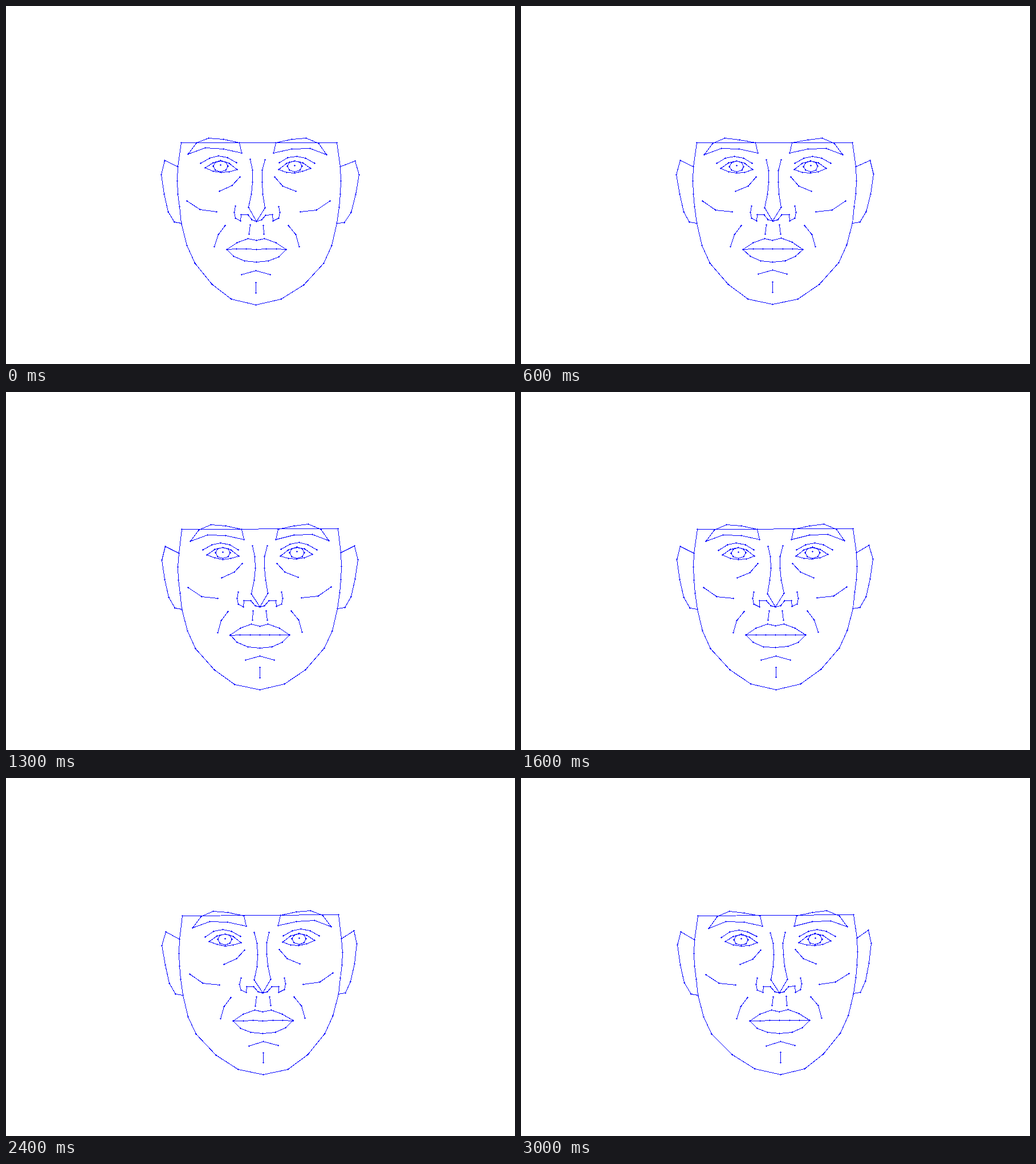
Write an HTML page that moves like this. It is 893 by 627 pixels and loops after 3.1 s.

```html
<!DOCTYPE html>
<html lang="en">
<head>
<meta charset="utf-8">
<title>Turning face</title>
<style>
  html, body { margin: 0; width: 100%; height: 100%; overflow: hidden; background: #fff; }
  svg { display: block; width: 893px; height: 627px; shape-rendering: crispEdges; }
  #lines { fill: none; stroke: #00f; }
  #dots { fill: #00f; }
</style>
</head>
<body>
<svg viewBox="0 0 893 627">
  <path id="lines"/>
  <path id="dots"/>
</svg>
<script>
const LOOP = 3100, STEP = 100, LAST = 29;
const AXIS = 445.5;   // where the turning axis stands
const START = -.42;   // how far the head is turned at first
const lines = document.getElementById('lines');
const dots = document.getElementById('dots');
const parts = [];

// A part is one half of the face: points are [distance from the middle, y].
// turn and lift say how far it moves right and down over the whole loop.
const value = v => typeof v === 'function' ? v : () => v;
function part(turn, lift, points, kind = 'open') {
  parts.push({ turn: value(turn), lift: value(lift), points, kind });
}

const pts = text => text.split(', ').map(p => p.split(' ').map(Number));

// Evenly spaced points on a parabola of height h between two ends.
const bow = (x0, y0, x1, y1, h, n = 4) => Array.from({ length: n + 1 }, (_, i) => {
  const s = i / n;
  return [x0 + (x1 - x0) * s, y0 + (y1 - y0) * s + 4 * h * s * (1 - s)];
});

const oval = (cx, cy, rx, ry, n = 8) => Array.from({ length: n }, (_, i) => {
  const a = i / n * 2 * Math.PI;
  return [cx + rx * Math.cos(a), cy + ry * Math.sin(a)];
});

// Skull: the middle is nearest to the viewer, the ears lie behind the axis.
const behind = x => Math.max(0, x - 145);
const skullTurn = x => Math.max(17 - x * x / 770, 3 - behind(x) / 6);
const skullLift = (x, y) => (300 - y) / 50 - behind(x) / 6;
part(skullTurn, skullLift, pts('136.7 239.5, 142.3 281.7, 143.5 306.2, 142.5 329.2, ' +
  '139.8 352, 136.5 380.5, 127 419.5, 113 450.5, 80.3 488, 43.5 513.8, 0 523.5'), 'whole');
part(skullTurn, skullLift, pts('142.3 281.7, 166.8 271, 173.6 295.7, 168 330, ' +
  '160.5 361, 149.2 379, 136.5 380.5'));

// Brows and eyes
part(10, 2, pts('121.5 260, 106.7 240, 85.5 231.2, 60 233.7, 32 239.5, 28 257.3, ' +
  '60.3 250.2, 92 249'), 'closed');
part(9.5, 2.8, bow(100, 275.3, 37.5, 274.8, -12));
part(9.5, 2, [...bow(92.5, 284, 36.5, 286.5, -13.7), ...bow(36.5, 286.5, 92.5, 284, 6.8)]);
part(9.5, 2, oval(65, 280.7, 12.6, 9.7), 'closed');
part(9.5, 2, [[65, 279]]);

// Nose
part((x, y) => 9.3 + (y - 269) * .045, (x, y) => 2 - (y - 269) * .024,
  pts('13 269, 8.5 287.8, 8.3 308.2, 9.8 329.5, 14.5 353, 0 377'));
part(x => 14 - x / 25, -.6, pts('38 351, 40.2 361.5, 38 371.5, 28.7 376.2, ' +
  '27.8 365.7, 15.8 366, 8.3 374.8, 0 377'));

// Folds under the eyes, on the cheeks, beside the mouth and below the nose
part(9.8, 1.7, pts('66.8 324.5, 44.5 315, 30.5 299.5'));
part(7, 1.7, pts('125.5 341.5, 102.2 357, 73.5 360.2'));
part(13, -.7, pts('55.5 384.4, 68 400.3, 74.3 421.4'));
part(14, -.9, pts('11.5 384, 13.3 399.7'));

// Mouth and chin
part(14.6, -1.2, pts('0 410.5, 14.5 407.2, 34 414.2, 52.2 426.3, 39.5 439, 21.2 446.7, 0 448.5'));
part(14.6, -1.2, bow(52.2, 426.4, 0, 426, -.4, 3));
part(17, -1.3, pts('25.2 470.2, 0 463'));
part(17, -4, pts('0 484.5, 0 502'));

// Pixel of a point on one side (-1 left, 1 right) at progress k.
function place({ turn, lift }, [x, y], side, k) {
  const wide = side * (x - behind(x) * k / 9);
  const roll = wide * (.001 - .01 * k);
  return [
    Math.floor(AXIS + wide + turn(x, y) * (START + k)),
    Math.floor(y + lift(x, y) * k + roll)
  ];
}

function draw(k) {
  let path = '', marks = '';
  const stroke = (points, closed) => {
    points.forEach(([x, y], i) => {
      path += `${i ? 'L' : 'M'}${x + .5} ${y + .5}`;
      marks += `M${x} ${y - 1}h1v1h1v1h-1v1h-1v-1h-1v-1h1z`;
    });
    if (closed) path += 'Z';
  };
  for (const p of parts) {
    const [left, right] = [-1, 1].map(side => p.points.map(pt => place(p, pt, side, k)));
    if (p.kind === 'whole') {
      stroke([...left, ...right.reverse()], true);
    } else {
      stroke(left, p.kind === 'closed');
      stroke(right, p.kind === 'closed');
    }
  }
  lines.setAttribute('d', path);
  dots.setAttribute('d', marks);
}

let shown = -1;
function tick() {
  const t = performance.now() % LOOP;
  const step = Math.max(0, Math.floor(t / STEP) - 1);
  if (step !== shown) draw((shown = step) / LAST);
  requestAnimationFrame(tick);
}
tick();
</script>
</body>
</html>
```
